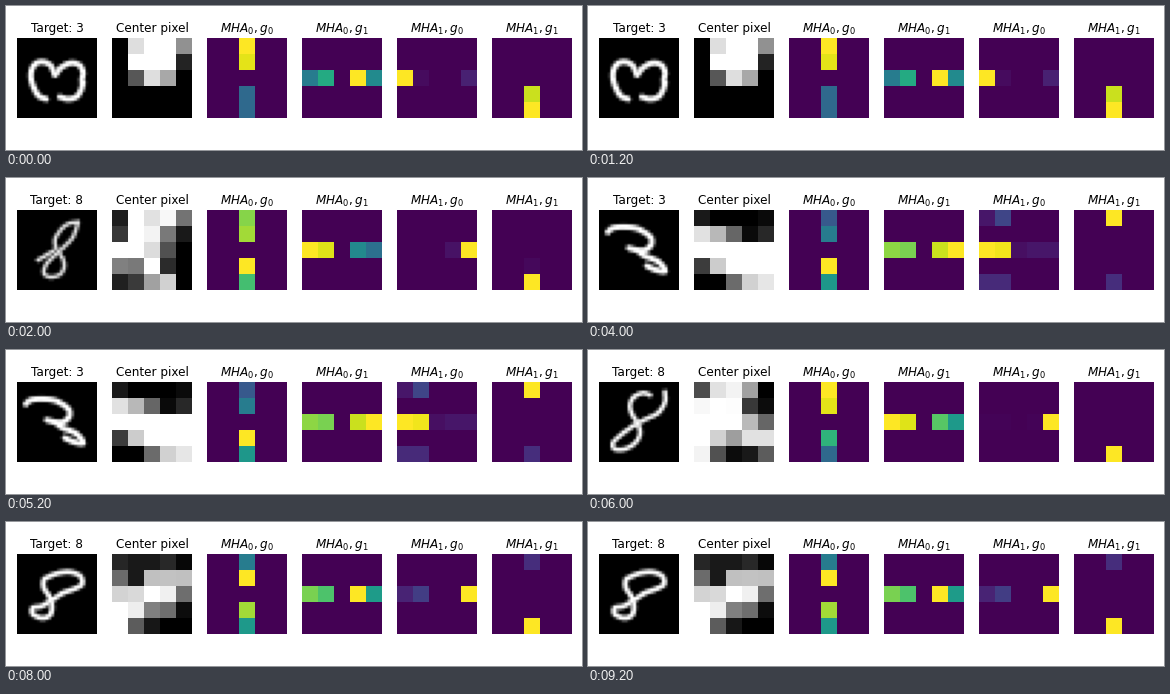
A matplotlib script for the animation above (10 s loop, 576 by 144 pixels).

```python
import numpy as np
import matplotlib.pyplot as plt
from matplotlib.animation import FuncAnimation

W, H, DPI = 576, 144, 72
SIDE, LEFT, STEP, BOTTOM = 80, 11, 95, 32
CELLS = 28

fig = plt.figure(figsize=(W / DPI, H / DPI), dpi=DPI, facecolor="white")


def smooth(points, n=12):
    """Catmull-Rom curve through the points."""
    p = np.array(points, float)
    p = np.vstack([2 * p[0] - p[1], p, 2 * p[-1] - p[-2]])
    t = np.linspace(0, 1, n)[:, None]
    parts = []
    for a, b, c, d in zip(p, p[1:], p[2:], p[3:]):
        parts.append(0.5 * (2 * b + (c - a) * t
                            + (2 * a - 5 * b + 4 * c - d) * t ** 2
                            + (3 * b - a - 3 * c + d) * t ** 3))
    return np.vstack(parts)


def digit(strokes, radius, peak=1.0):
    """Soft pen strokes, given in panel pixels, on a 28 x 28 grid."""
    centre = np.arange(CELLS) + 0.5
    gx, gy = np.meshgrid(centre, centre)
    img = np.zeros((CELLS, CELLS))
    for stroke in strokes:
        x, y = smooth(stroke).T * CELLS / SIDE
        dist = np.hypot(gx[..., None] - x, gy[..., None] - y).min(axis=-1)
        img = np.maximum(img, np.clip(radius + 0.5 - dist, 0, 1))
    return img * peak


def column(*values):
    grid = np.zeros((5, 5))
    grid[:, 2] = values
    return grid


def row(*values):
    return column(*values).T


def corners(grid, top, bottom):
    grid[0, :2] = top
    grid[4, :2] = bottom
    return grid


scenes = [
    dict(
        label=3,
        digit=digit([
            [(29, 61), (22, 58), (17, 50), (14, 40), (15, 31), (20, 25),
             (27, 24), (34, 28), (38, 37)],
            [(38, 37), (45, 29), (54, 25), (62, 27), (66, 34), (65, 42),
             (66, 46)],
            [(66, 44), (64, 52), (59, 59), (51, 61), (43, 59)],
        ], 1.0),
        patch=[[0, .87, 1, 1, .57],
               [0, 1, 1, 1, .14],
               [0, .34, .87, .66, 0],
               [0] * 5,
               [0] * 5],
        heads=[column(1, .96, 0, .34, .34), row(.42, .61, 0, 1, .48),
               row(1, .03, 0, 0, .09), column(0, 0, 0, .92, 1)],
    ),
    dict(
        label=8,
        digit=digit([
            [(61, 12), (51, 14), (43, 21), (38, 30), (40, 40), (46, 49),
             (47, 58), (42, 65), (33, 67), (27, 63), (29, 55), (37, 46),
             (47, 37), (56, 27), (61, 13)],
            [(21, 50), (28, 46), (36, 41)],
        ], 0.7, 0.9),
        patch=[[.12, 1, .88, .97, .45],
               [.22, 1, .95, .48, .1],
               [1, 1, .86, .32, 0],
               [.5, .48, 1, .17, 0],
               [.13, .23, .63, .82, 0]],
        heads=[column(.82, .86, 0, 1, .7), row(1, .95, 0, .47, .37),
               row(0, 0, 0, .05, 1), column(0, 0, 0, .02, 1)],
    ),
    dict(
        label=3,
        digit=digit([
            [(9, 22), (14, 18), (24, 17), (36, 18), (45, 22), (52, 28),
             (52, 35), (46, 40), (38, 40), (30, 38)],
            [(30, 38), (39, 41), (46, 46), (54, 49), (61, 53), (66, 61),
             (57, 60), (48, 56)],
        ], 1.0),
        patch=[[.1, 0, 0, 0, .04],
               [.88, .72, .4, .04, .16],
               [1] * 5,
               [.24, .8, 1, 1, 1],
               [0, 0, .42, .82, .9]],
        heads=[column(.28, .42, 0, 1, .53), row(.83, .8, 0, .92, 1),
               corners(row(1, .98, .04, .06, .06), (.06, .21), (.12, .12)),
               column(1, 0, 0, 0, .13)],
    ),
    dict(
        label=8,
        digit=digit([
            [(66, 10), (66, 20), (59, 31), (47, 37), (34, 44), (22, 53),
             (14, 61), (16, 67), (26, 67), (36, 61), (41, 52), (39, 42),
             (33, 32), (31, 23), (35, 15), (44, 11), (51, 13)],
        ], 0.8),
        patch=[[.3, .88, .95, .63, 0],
               [.97, 1, .99, .22, .05],
               [1, 1, 1, .73, .4],
               [1, .82, .62, .88, .88],
               [.95, .32, .05, .1, .36]],
        heads=[column(1, .96, 0, .65, .34), row(1, .95, 0, .74, .54),
               row(.01, .01, 0, .01, 1), column(0, 0, 0, 0, 1)],
    ),
    dict(
        label=8,
        digit=digit([
            [(33, 22), (42, 19), (53, 18), (63, 22), (65, 30), (57, 35),
             (46, 39), (35, 46), (25, 52), (16, 54), (16, 60), (25, 64),
             (33, 61), (35, 52), (32, 42), (27, 34), (27, 26), (33, 22)],
        ], 0.9),
        patch=[[.15, .1, .1, .16, .03],
               [.42, .1, .75, .76, .75],
               [.83, .85, 1, .94, .43],
               [1, .93, .5, .43, .05],
               [1, .36, .09, 0, 0]],
        heads=[column(.42, 1, 0, .86, .54), row(.8, .72, 0, 1, .55),
               row(.1, .18, 0, 0, 1), column(.13, 0, 0, 0, 1)],
    ),
]

titles = ["", "Center pixel"] + [
    rf"$MHA_{m}, g_{g}$" for m in (0, 1) for g in (0, 1)]

panels = []
for i, title in enumerate(titles):
    ax = fig.add_axes([(LEFT + i * STEP) / W, BOTTOM / H, SIDE / W, SIDE / H])
    ax.axis("off")
    ax.set_title(title, fontsize=12)
    size = CELLS if i == 0 else 5
    panels.append(ax.imshow(np.zeros((size, size)), vmin=0, vmax=1,
                            cmap="gray" if i < 2 else "viridis"))


def update(k):
    scene = scenes[k]
    panels[0].axes.set_title(f"Target: {scene['label']}", fontsize=12)
    grids = [scene["digit"], np.array(scene["patch"], float), *scene["heads"]]
    for panel, grid in zip(panels, grids):
        panel.set_data(grid)
    return panels


anim = FuncAnimation(fig, update, frames=len(scenes), interval=2000,
                     repeat=True, repeat_delay=0, blit=False)
plt.show()
```
